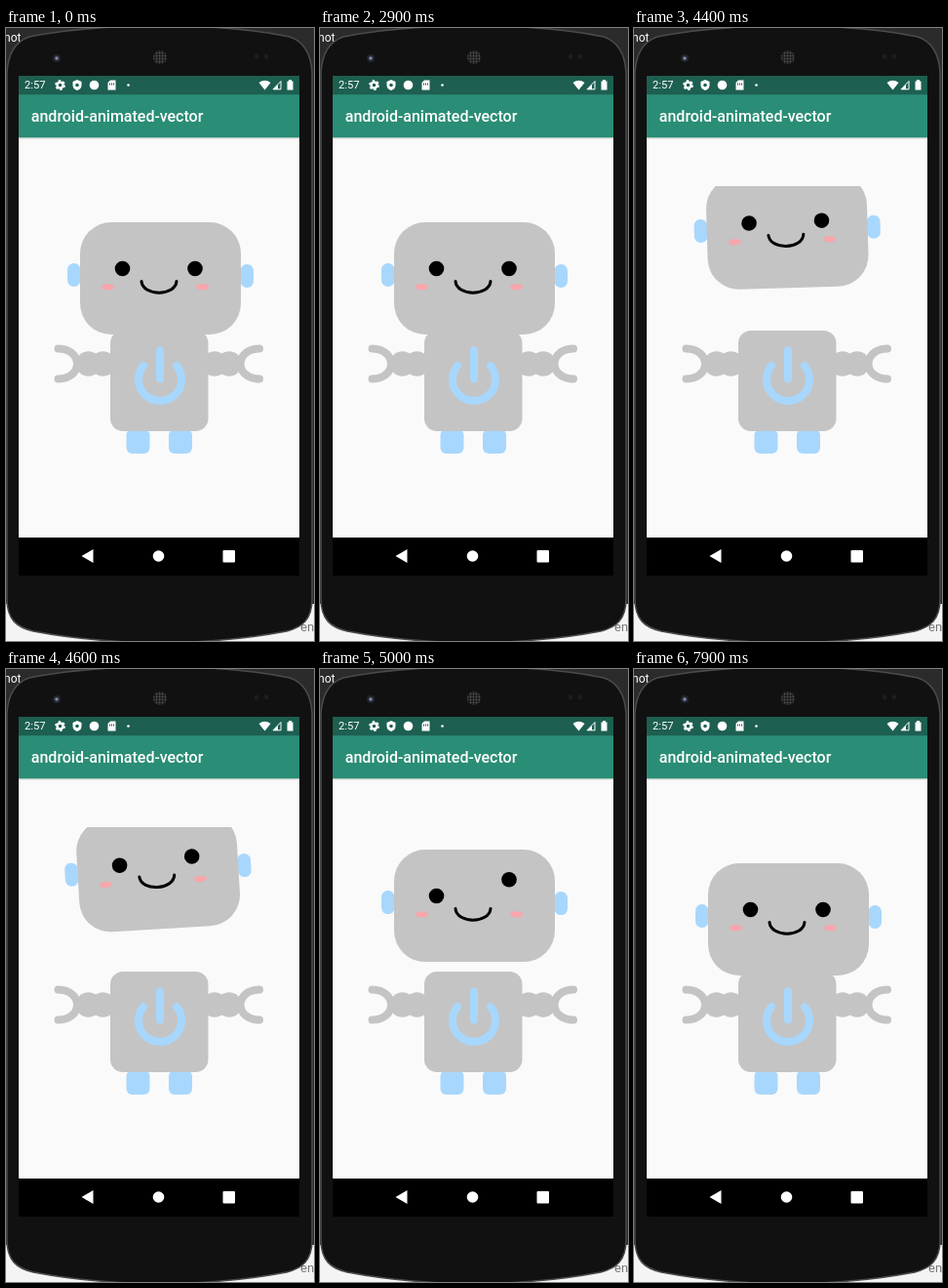
Write an HTML page that moves like this. It is 316 px wide and 628 px high and loops after 8000 ms.

```html
<!DOCTYPE html>
<html lang="en">
<head>
<meta charset="utf-8">
<title>Robot</title>
<style>
  html, body { margin: 0; width: 100%; height: 100%; overflow: hidden; }
  svg { display: block; width: 316px; height: 628px; }
  text { font-family: Roboto, Arial, sans-serif; fill: #fff; }
  .skin { fill: #c4c4c4; }
  .blue { fill: #a8d7fd; }
  .line { fill: none; stroke-linecap: round; }
</style>
</head>
<body>
<svg viewBox="0 0 316 628">
  <defs>
    <clipPath id="art"><rect x="13" y="162" width="288" height="310"/></clipPath>
    <pattern id="mesh" width="3" height="3" patternUnits="userSpaceOnUse">
      <rect width="3" height="3" fill="#1c1c1c"/><circle cx="1.5" cy="1.5" r=".9" fill="#555"/>
    </pattern>
    <g id="arm">
      <path class="line" d="M53.5 328.5C79.5 329 79.5 359 53.5 359.5" stroke="#c4c4c4" stroke-width="8"/>
      <circle class="skin" cx="84.5" cy="344" r="12.8"/>
      <circle class="skin" cx="99.5" cy="344" r="12.8"/>
    </g>
  </defs>

  <!-- desktop and phone -->
  <rect width="316" height="628" fill="#f4f4f4"/>
  <rect width="316" height="590" fill="#2b2b2b"/>
  <text x="-2" y="14" font-size="12">not</text>
  <text x="302" y="618" font-size="13" style="fill:#777">en</text>
  <path d="M1 45Q3 16 24 9Q70 0 130 -2H186Q246 0 291 9Q312 16 314 45V585C314 606 304 614 288 618Q230 629 158 630Q85 629 28 618C11 614 1 606 1 585Z" fill="#111" stroke="#4a4b4c" stroke-width="1.5"/>
  <circle cx="52" cy="31" r="4" fill="#23262e"/>
  <circle cx="52" cy="31" r="1.8" fill="#8088a4"/>
  <circle cx="158" cy="30" r="7" fill="url(#mesh)"/>
  <circle cx="257" cy="29" r="2.5" fill="#1d1d1d"/>
  <circle cx="267" cy="29" r="2.5" fill="#1d1d1d"/>

  <!-- screen -->
  <rect x="13" y="49" width="288" height="512"/>
  <rect x="13" y="112" width="288" height="410" fill="#fafafa"/>
  <rect x="13" y="112" width="288" height="1" fill="#b4c8c2"/>
  <rect x="13" y="113" width="288" height="1" fill="#e4e6e5"/>
  <rect x="13" y="68" width="288" height="44" fill="#2a8d75"/>
  <rect x="13" y="49" width="288" height="19.2" fill="#1d5f50"/>
  <text x="19" y="62.3" font-size="11.2">2:57</text>
  <text x="25.8" y="96.1" font-size="16" font-weight="500">android-animated-vector</text>

  <g fill="#fff">
    <circle cx="55.5" cy="58.5" r="3" fill="none" stroke="#fff" stroke-width="2.4"/>
    <circle cx="55.5" cy="58.5" r="4.6" fill="none" stroke="#fff" stroke-width="1.6" stroke-dasharray="2.4 2.417"/>
    <path d="M73 53L77.5 55V58.5Q77.5 62.5 73 64Q68.5 62.5 68.5 58.5V55Z"/>
    <circle cx="73" cy="58.5" r="1.8" fill="#1d5f50"/>
    <circle cx="90.5" cy="58.5" r="4.8"/>
    <path d="M107 53.5H112.5V63.5H104.5V56Z"/>
    <path d="M106.5 56.5V58.5M108.5 56.5V58.5M110.5 56.5V58.5" stroke="#1d5f50"/>
    <circle cx="125.5" cy="58.5" r="1.3"/>
    <path d="M259.5 56Q265.5 51.5 271.5 56L265.5 63.5Z"/>
    <path d="M274 62.8H282V54.5Z" fill="none" stroke="#fff"/>
    <path d="M274 63L279 58V63Z"/>
    <path d="M288.5 54.5H290V53H293V54.5H294.5V63.5H288.5Z"/>
    <path d="M89.5 534V548L77.5 541Z"/>
    <circle cx="156.5" cy="541" r="5.8"/>
    <rect x="222.5" y="535" width="12.5" height="12.5" rx="1"/>
  </g>

  <!-- robot -->
  <g clip-path="url(#art)">
    <use href="#arm"/>
    <use href="#arm" transform="matrix(-1 0 0 1 313.5 0)"/>
    <rect class="blue" x="123.5" y="411" width="24" height="25" rx="6"/>
    <rect class="blue" x="167" y="411" width="24" height="25" rx="6"/>
    <rect class="skin" x="107" y="310" width="100.5" height="103" rx="13"/>
    <path class="line" d="M141 346A22 22 0 1 0 175 346M158 330.5V359.5" stroke="#a8d7fd" stroke-width="8"/>
    <g id="head">
      <rect class="blue" x="63" y="241" width="13.5" height="24" rx="6.5"/>
      <rect class="blue" x="240.5" y="242" width="13.5" height="24" rx="6.5"/>
      <rect class="skin" x="76" y="199" width="165" height="115" rx="32"/>
      <ellipse cx="104.5" cy="265.3" rx="6.5" ry="3.2" fill="#f7a6ac"/>
      <ellipse cx="201.5" cy="265.3" rx="6.5" ry="3.2" fill="#f7a6ac"/>
      <path class="line" d="M139 259.5C140.5 275 173.5 275 175 259.5" stroke="#000" stroke-width="3"/>
      <circle cx="119.5" cy="246.5" r="7.8"/>
      <circle id="eye" cx="194" cy="246.5" r="7.8"/>
    </g>
  </g>
</svg>
<script>
  const LOOP = 8000;
  const head = document.getElementById('head');
  const eye = document.getElementById('eye');

  const part = (t, from, to) => Math.min(1, Math.max(0, (t - from) / (to - from)));
  const smooth = p => (1 - Math.cos(Math.PI * p)) / 2;

  function draw(t) {
    const rise = part(t, 3300, 4300) ** 2 - smooth(part(t, 4600, 5230));
    const tilt = Math.sin(Math.PI * part(t, 4300, 4900));
    const lift = smooth(part(t, 4300, 5200)) - smooth(part(t, 5200, 6150));
    head.setAttribute('transform', `translate(0 ${-47.7 * rise}) rotate(${-3.4 * tilt} 158.5 297)`);
    eye.setAttribute('transform', `translate(0 ${-19 * lift})`);
  }

  const start = performance.now();
  function tick() {
    draw((performance.now() - start) % LOOP);
    requestAnimationFrame(tick);
  }
  tick();
</script>
</body>
</html>
```
